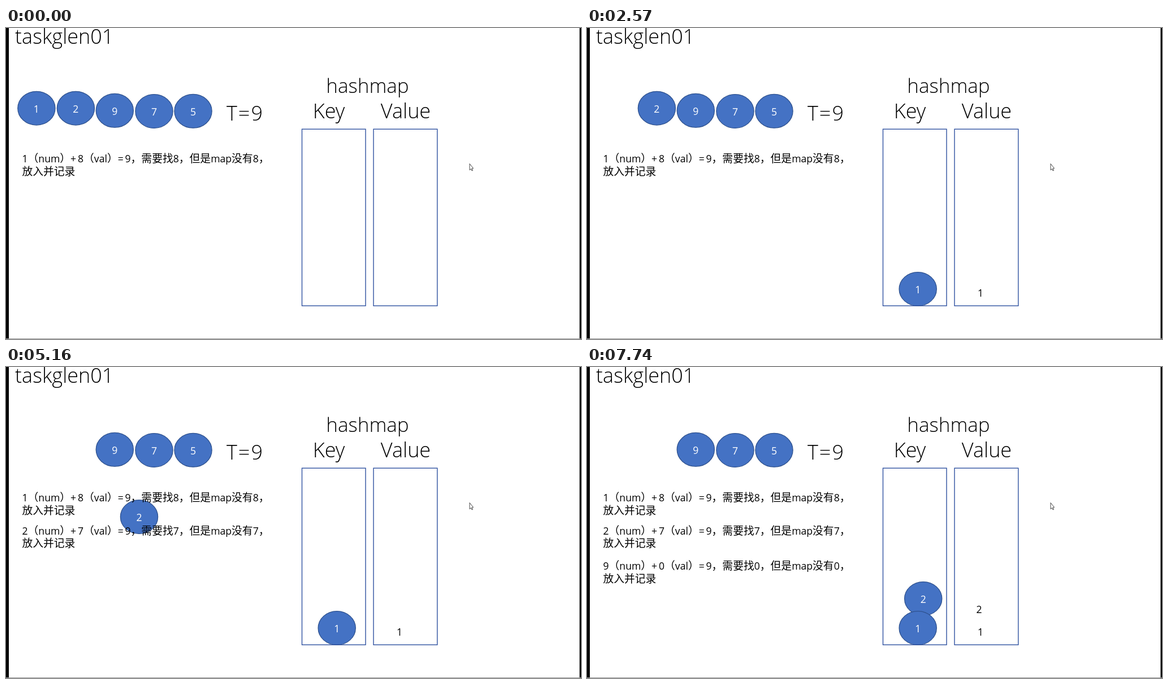
Recreate the animation shown at these times as an HTML page. Size 1017 by 551 pixels, loop 8000 ms.

```html
<!DOCTYPE html>
<html lang="zh-CN">
<head>
<meta charset="utf-8">
<style>
  html, body { margin: 0; width: 100%; height: 100%; overflow: hidden; background: #fff; }
  svg { display: block; width: 1017px; height: 551px; }
  text { font: 17.6px "Open Sans", "Noto Sans", sans-serif; }
  .big { font-size: 36px; font-weight: 300; }
  .mid { text-anchor: middle; }
  .note { font: 350 18.8px "Noto Sans CJK SC", "Noto Sans CJK", sans-serif; }
  .latin { font: 400 17.6px "Open Sans", "Noto Sans", sans-serif; }
  .sign { letter-spacing: 2.8px; }
  .ball ellipse { fill: #4472c4; stroke: #2f528f; stroke-width: 1.3; }
  .ball text { fill: #fff; text-anchor: middle; }
  .box { fill: none; stroke: #2f52a0; stroke-width: 1.4; }
</style>
</head>
<body>
<svg viewBox="0 0 1017 551">
  <rect width="5" height="551"/>
  <rect x="1014.5" width="2.5" height="551"/>
  <rect y="550" width="1017" height="1" fill="#999"/>

  <text class="big" x="16" y="28">taskglen01</text>
  <text class="big" x="390" y="164" letter-spacing="2">T=9</text>
  <text class="big mid" x="639.5" y="114.5" style="font-size:35px">hashmap</text>
  <text class="big mid" x="571" y="160">Key</text>
  <text class="big mid" x="707" y="160">Value</text>

  <g id="balls"></g>
  <rect class="box" x="523.5" y="179.2" width="112.5" height="313"/>
  <rect class="box" x="650" y="179.2" width="112.8" height="313"/>
  <g id="notes"></g>
  <text class="mid" id="value1" x="696" y="475.5">1</text>
  <text class="mid" id="value2" x="693.5" y="435.5">2</text>

  <path d="M820 240.5v11.2l2.4-2.1 1.6 3.4 1.5-.7-1.6-3.3 2.7-.3z"
        fill="#fff" stroke="#333" stroke-width=".9"/>
  <circle id="ring" cx="820.5" cy="241.5" r="6" fill="none" stroke="#444"/>
</svg>
<script>
const LOOP = 8000;
const $ = id => document.getElementById(id);

// Each stop is [start time, centre x, centre y], held until the next one.
const balls = [
  { n: 5, stops: [[0, 331, 147.3]] },
  { n: 7, stops: [[0, 262, 147.5]] },
  { n: 9, stops: [[0, 192.3, 146.3]] },
  { n: 2, stops: [[0, 123.4, 142.2], [4660, 123.4, 162], [5160, 235.5, 265.5],
                  [5660, 540.6, 347.7], [6180, 594.7, 411.7], [6680, 594.7, 410.5]] },
  { n: 1, stops: [[0, 53.9, 142.2], [520, 61.5, 159.7], [1020, 310.6, 214.2],
                  [1550, 602.5, 325], [2050, 586, 460], [2570, 585.2, 462.5]] }
];

// Times at which an element turns on, off, on, ...
const shown = {
  note0: [0], note1: [3600], note2: [7740],
  value1: [2570], value2: [6680],
  ring: [6180, 6680, 7210, 7740]
};

$('balls').innerHTML = balls.map(b =>
  `<g class="ball" id="ball${b.n}"><ellipse rx="33.1" ry="29.9"/><text y="7.8">${b.n}</text></g>`).join('');

const markup = s => s.replace(/[+=]|\w+/g, m =>
  `<tspan class="latin${/\w/.test(m) ? '' : ' sign'}">${m}</tspan>`);

$('notes').innerHTML = [[1, 8, 238], [2, 7, 296.5], [9, 0, 359.3]].map(([a, b, y], i) =>
  `<g id="note${i}">
    <text class="note" x="28.5" y="${y}">${markup(`${a}（num）+${b}（val）=9，需要找${b}，但是map没有${b}，`)}</text>
    <text class="note" x="28.5" y="${y + 22.7}">放入并记录</text>
  </g>`).join('');

function draw(now) {
  const t = now % LOOP;
  for (const { n, stops } of balls) {
    const [, x, y] = stops.filter(s => s[0] <= t).pop();
    $('ball' + n).setAttribute('transform', `translate(${x} ${y})`);
  }
  for (const id in shown) {
    const on = shown[id].filter(s => s <= t).length % 2;
    $(id).setAttribute('visibility', on ? 'visible' : 'hidden');
  }
}

const start = performance.now();
function tick() {
  draw(performance.now() - start);
  requestAnimationFrame(tick);
}
tick();
</script>
</body>
</html>
```
